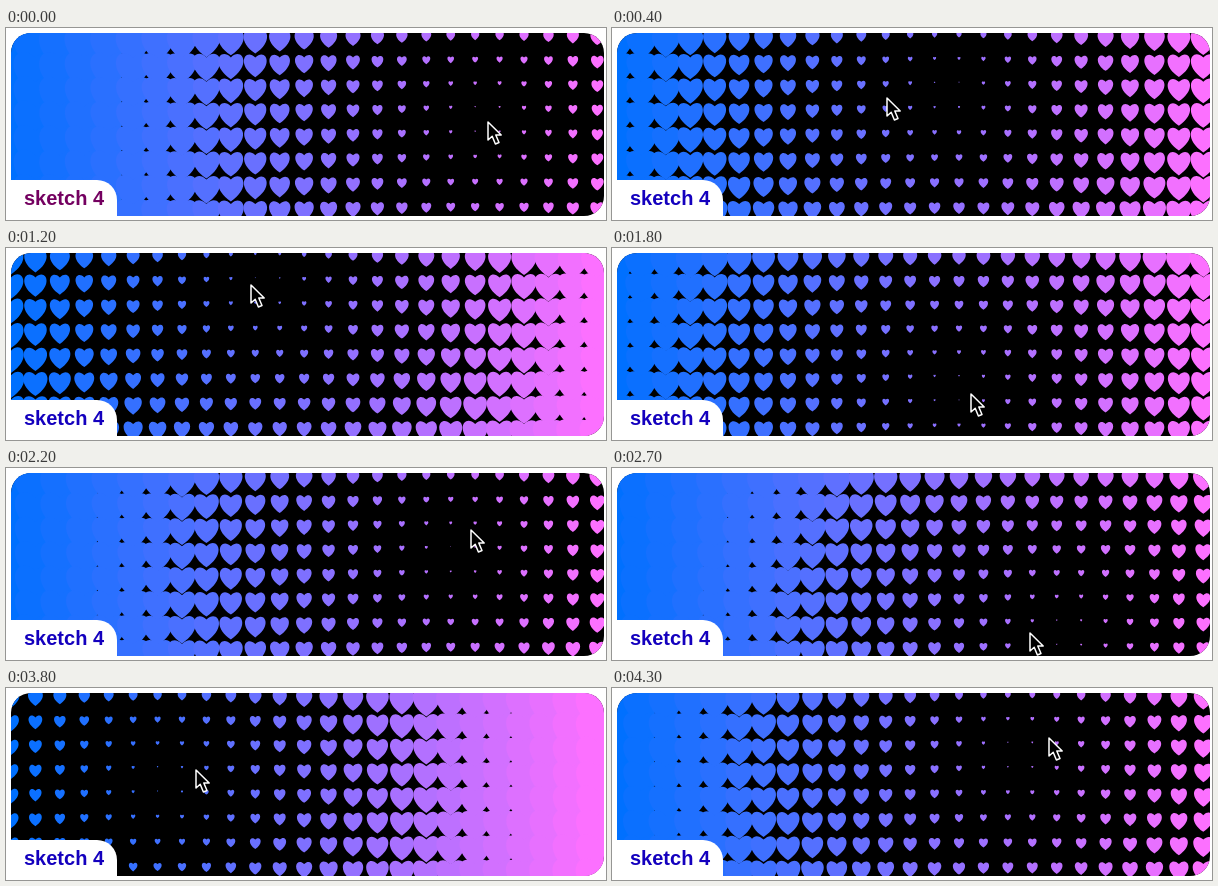
Recreate the animation shown at these times as an HTML page. Size 600 by 192 pixels, loop 4.4 s.

```html
<!DOCTYPE html>
<html lang="en">
<head>
<meta charset="utf-8">
<title>sketch 4</title>
<style>
  html, body { margin: 0; width: 100%; height: 100%; overflow: hidden; background: #fff; }
  svg { display: block; width: 100%; height: 100%; }
  text { font: bold 20px "Liberation Sans", Arial, sans-serif; }
</style>
</head>
<body>
<svg viewBox="0 0 600 192">
  <defs>
    <clipPath id="card"><rect x="5" y="5" width="593" height="183" rx="20"/></clipPath>
  </defs>
  <g clip-path="url(#card)">
    <rect x="5" y="5" width="593" height="183"/>
    <g id="hearts"></g>
  </g>
  <path d="M4 152H91A20 20 0 0 1 111 172V189H4Z" fill="#fff"/>
  <text id="label" x="18" y="177">sketch 4</text>
  <path id="cursor" d="M0 0V18L4.2 14.2L7.4 22L11 20.5L7.8 13H13.2Z"
        stroke="#fff" stroke-width="1.5" stroke-linejoin="round"/>
</svg>
<script>
const LOOP = 4400, STEP = 100, LAG = 100;
const COLS = 25, ROWS = 8, CELL = 24.43, LEFT = 5, TOP = 5, WIDTH = 593;
const HEART = 'M0 0C-.5 -.5 -1 .3333 0 1C1 .3333 .5 -.5 0 0Z';

// Pointer path: time, x, y
const path = [
  [-200, 468, 84], [-100, 476, 90], [0, 482, 94], [200, 400, 58], [400, 275, 70], [500, 252, 112],
  [600, 281, 140], [700, 333, 147], [850, 385, 100], [1000, 310, 40],
  [1100, 258, 30], [1200, 245, 37], [1450, 262, 105], [1700, 342, 143],
  [1800, 359, 146], [2000, 430, 115], [2200, 465, 62], [2400, 492, 115],
  [2600, 452, 165], [2700, 418, 165], [2950, 320, 168], [3200, 228, 163],
  [3300, 187, 163], [3550, 130, 115], [3800, 190, 82], [4000, 300, 84],
  [4200, 404, 64], [4300, 437, 50], [4400, 462, 42]
];

const slope = (i, k) => {
  const a = path[Math.max(i - 1, 0)], b = path[Math.min(i + 1, path.length - 1)];
  return (b[k] - a[k]) / (b[0] - a[0]);
};

function pointer(t) {
  let i = 0;
  while (i < path.length - 2 && path[i + 1][0] <= t) i++;
  const a = path[i], b = path[i + 1], d = b[0] - a[0], u = (t - a[0]) / d, v = 1 - u;
  return [1, 2].map(k =>
    v * v * (1 + 2 * u) * a[k] + u * u * (1 + 2 * v) * b[k] +
    d * u * v * (v * slope(i, k) - u * slope(i + 1, k)));
}

const get = id => document.getElementById(id);
const label = get('label'), cursor = get('cursor');
const hearts = [];

for (let c = 0; c < COLS; c++) {
  for (let r = 0; r < ROWS; r++) {
    const x = LEFT + c * CELL, y = TOP + r * CELL;
    const el = document.createElementNS('http://www.w3.org/2000/svg', 'path');
    el.setAttribute('d', HEART);
    el.setAttribute('fill', `rgb(${Math.round((x - LEFT) / WIDTH * 255)},112,255)`);
    get('hearts').append(el);
    hearts.push({ el, x, y });
  }
}

function draw(t) {
  const [px, py] = pointer(t), [fx, fy] = pointer(t - LAG);
  for (const { el, x, y } of hearts) {
    const size = Math.hypot(x - fx, y - fy) * 50 / WIDTH;
    el.setAttribute('transform', `translate(${x} ${y}) scale(${size})`);
  }
  cursor.setAttribute('transform', `translate(${px} ${py})`);
  const k = Math.min(t / 300, 1), mix = (a, b) => Math.round(a + (b - a) * k);
  label.setAttribute('fill', `rgb(${mix(116, 20)},0,${mix(96, 190)})`);
}

function tick() {
  draw(Math.floor(performance.now() % LOOP / STEP) * STEP);
  requestAnimationFrame(tick);
}
tick();
</script>
</body>
</html>
```
